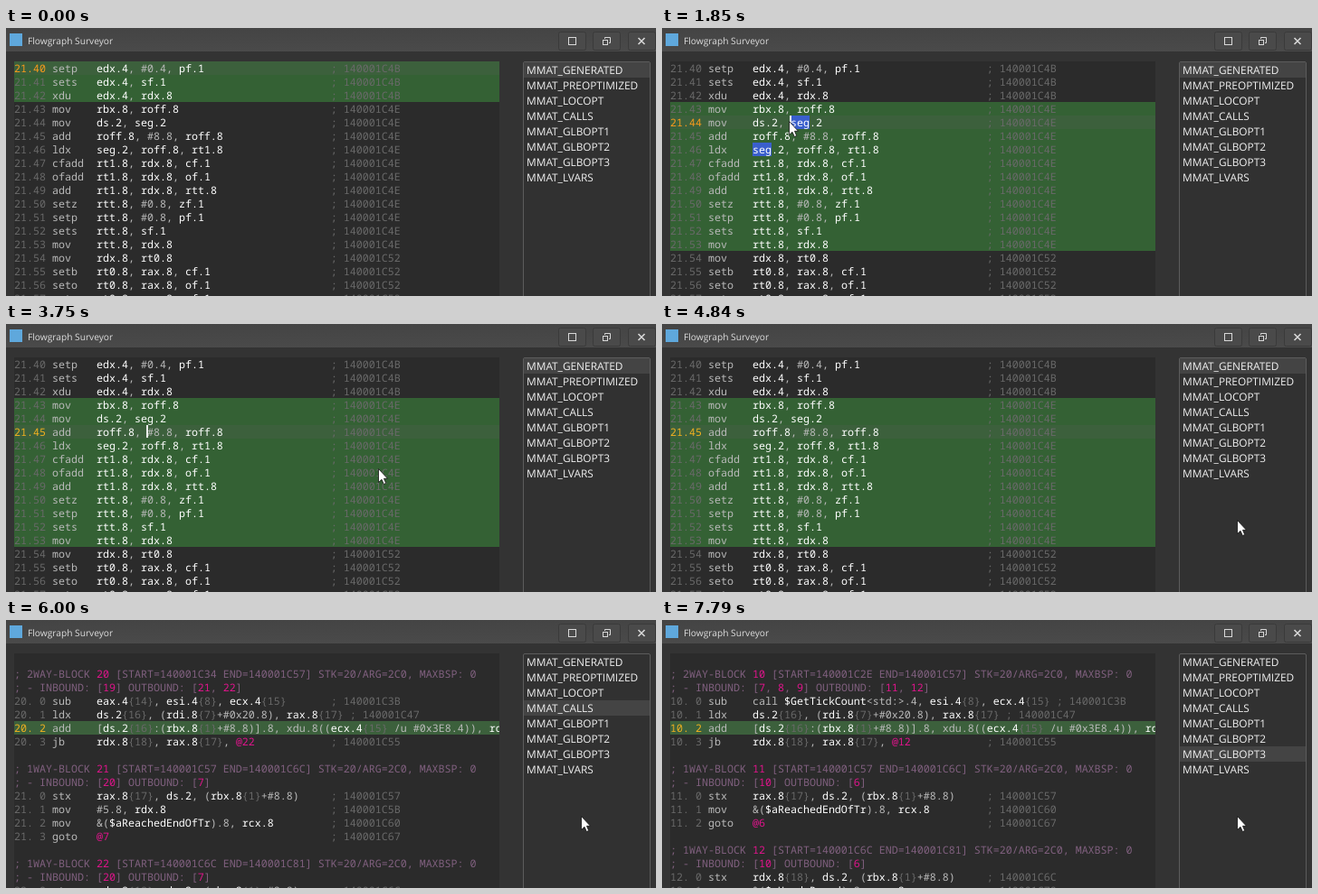
Recreate the animation shown at these times as an HTML page. Size 718x297 px, loop 8000 ms.

```html
<!DOCTYPE html>
<html lang="en">
<head>
<meta charset="utf-8">
<title>Flowgraph Surveyor</title>
<style>
html, body { margin: 0; width: 100%; height: 100%; overflow: hidden; background: #333; }
#stage { position: absolute; left: 0; top: 0; width: 718px; height: 297px; overflow: hidden;
  background: #333; font-family: "Open Sans", "Noto Sans", sans-serif; text-rendering: geometricPrecision; }
#stage div, #stage svg { position: absolute; }
#bar { left: 0; top: 0; width: 718px; height: 26px; background: linear-gradient(#444, #4a4a4a); }
#icon { left: 4px; top: 6px; width: 14px; height: 14px; background: #5fa8dc; }
#title { left: 24px; top: 6px; font-size: 10.2px; line-height: 16px; color: #dcdcdc; white-space: pre; }
#code { left: 9px; top: 37px; width: 536px; height: 260px; overflow: hidden; background: #2b2b2b;
  font: 11.667px/17px "Noto Sans Mono", "DejaVu Sans Mono", monospace; color: #bababa; }
#code .row { left: 0; width: 536px; height: 15px; white-space: pre; }
.num, .dim { color: #696969; }
.reg { color: #fff; }
.pink { color: #e0148c; }
.note { color: #80607f; }
.lilac { color: #b98abb; }
.green { background: #346134; }
.green.here { background: #3c603c; }
#code .mark { height: 15px; width: 21px; background: #3a5fcd; }
#caret { width: 2px; height: 14px; background: #f0f0f0; }
#list { left: 571px; top: 37px; width: 139px; height: 270px; border: 1px solid #5c5c5c; border-radius: 2px;
  background: #313131; }
#list div { left: 0; width: 136px; height: 17px; padding-left: 3px; font-size: 11.85px; line-height: 19px; color: #f0f0f0; }
#list .on { background: #444; }
#over { left: 0; top: 0; }
</style>
</head>
<body>
<div id="stage">
  <div id="bar"></div>
  <div id="icon"></div>
  <div id="title">Flowgraph Surveyor</div>
  <svg id="buttons" width="718" height="30" fill="none" stroke="#d8d8d8">
    <g fill="#4a4a4a" stroke="#3a3a3a">
      <rect x="610.5" y="4.5" width="30" height="20" rx="2"/>
      <rect x="648.5" y="4.5" width="30" height="20" rx="2"/>
      <rect x="687.5" y="4.5" width="30" height="20" rx="2"/>
    </g>
    <rect x="621.5" y="10.5" width="8" height="8"/>
    <path d="M661.5 12V10.5H667.5V16.5H666"/>
    <rect x="659.5" y="13.5" width="5" height="5"/>
    <path d="M698.5 11L705.5 18M705.5 11L698.5 18" stroke-width="1.6"/>
  </svg>
  <div id="code"></div>
  <div id="caret"></div>
  <div id="list"></div>
  <svg id="over" width="718" height="297">
    <circle id="click" r="11.5" fill="#bdb418" fill-opacity=".85"/>
    <path id="arrow" d="M.5 .5V15.5L4 12.3L6.3 17.5L8.7 16.5L6.5 11.3H10.5Z"
      fill="#fff" stroke="#111" stroke-width=".8"/>
  </svg>
</div>
<script>
const LOOP = 8000, ROW = 15, CHAR = 7, LEFT = 9, TOP = 37;
const $ = id => document.getElementById(id);

// Lines are "number mnemonic operands ;address tail"; comments start with ";".
const generated = `21.40 setp edx.4, #0.4, pf.1 ;4B
21.41 sets edx.4, sf.1 ;4B
21.42 xdu edx.4, rdx.8 ;4B
21.43 mov rbx.8, roff.8 ;4E
21.44 mov ds.2, seg.2 ;4E
21.45 add roff.8, #8.8, roff.8 ;4E
21.46 ldx seg.2, roff.8, rt1.8 ;4E
21.47 cfadd rt1.8, rdx.8, cf.1 ;4E
21.48 ofadd rt1.8, rdx.8, of.1 ;4E
21.49 add rt1.8, rdx.8, rtt.8 ;4E
21.50 setz rtt.8, #0.8, zf.1 ;4E
21.51 setp rtt.8, #0.8, pf.1 ;4E
21.52 sets rtt.8, sf.1 ;4E
21.53 mov rtt.8, rdx.8 ;4E
21.54 mov rdx.8, rt0.8 ;52
21.55 setb rt0.8, rax.8, cf.1 ;52
21.56 seto rt0.8, rax.8, of.1 ;52
21.57 setz rt0.8, rax.8, zf.1 ;52`;

const preoptimized = `21. 5 mul xdu.8(ecx.4), xdu.8(eax.4), rt2.8 ;45
21. 6 mov rt2^4.4, edx.4 ;45
21. 7 ldx ds.2, (rdi.8+#0x20.8), rax.8 ;47
21. 8 shr edx.4, #6.1, edx.4 ;4B
21. 9 xdu edx.4, rdx.8 ;4B
21.10 add [ds.2:(rbx.8+#8.8)].8, rdx.8, rdx.8 ;4E
21.11 setb rdx.8, rax.8, cf.1 ;52
21.12 seto rdx.8, rax.8, of.1 ;52
21.13 setz rdx.8, rax.8, zf.1 ;52
21.14 setp rdx.8, rax.8, pf.1 ;52
21.15 sets (rdx.8-rax.8), sf.1 ;52
21.16 jcnd cf.1, $loc_140001C6C ;55

; ????-BLOCK 22 PROP COMB [START=140001C57 END=140001C6C] STK=0/ARG=C0, MAXBSP: 0
22. 0 stx rax.8, ds.2, (rbx.8+#8.8) ;57
22. 1 mov #5.4, edx.4 ;5B
22. 2 xdu edx.4, rdx.8 ;5B
22. 3 mov &($aReachedEndOfTr).8, rcx.8 ;60`;

const block = (way, n, start, end, from, to) =>
  `; ${way}WAY-BLOCK ${n} [START=140001C${start} END=140001C${end}] STK=20/ARG=2C0, MAXBSP: 0
; - INBOUND: [${from}] OUTBOUND: [${to}]`;

const local = `; - INBOUND: [20] OUTBOUND: [22, 23]
21. 0 sub eax.4, esi.4, ecx.4 ;3B
21. 1 mul xdu.8(ecx.4), xdu.8(eax.4), rt2.8 ;45
21. 2 ldx ds.2, (rdi.8+#0x20.8), rax.8 ;47
21. 3 shr rt2^4.4, #6.1, edx.4 ;4B
21. 4 add [ds.2:(rbx.8+#8.8)].8, xdu.8(edx.4), rdx.8 ;4E
21. 5 jb rdx.8, rax.8, @23 ;55

${block(1, 22, "57", "6C", "21", "8")}
22. 0 stx rax.8, ds.2, (rbx.8+#8.8) ;57
22. 1 mov #5.8, rdx.8 ;5B
22. 2 mov &($aReachedEndOfTr).8, rcx.8 ;60
22. 3 goto @8 ;67

${block(1, 23, "6C", "81", "21", "8")}
23. 0 stx rdx.8, ds.2, (rbx.8+#8.8) ;6C`;

const lateBlock = (n, head, from, to, exit) => `
${block(2, n, head, "57", from, to)}
${n}. 0 sub ${n == 10 ? "call $GetTickCount<std:>.4, esi.4{8}" : "eax.4{14}, esi.4{8}"}, ecx.4{15} ;3B
${n}. 1 ldx ds.2{16}, (rdi.8{7}+#0x20.8), rax.8{17} ;47
${n}. 2 add [ds.2{16}:(rbx.8{1}+#8.8)].8, xdu.8((ecx.4{15} /u #0x3E8.4)), rdx.8{18} ;4E
${n}. 3 jb rdx.8{18}, rax.8{17}, @${n + 2} ;55

${block(1, n + 1, "57", "6C", n, exit)}
${n + 1}. 0 stx rax.8{17}, ds.2, (rbx.8{1}+#8.8) ;57`;

const calls = `${lateBlock(20, "34", "19", "21, 22", 7)}
21. 1 mov #5.8, rdx.8 ;5B
21. 2 mov &($aReachedEndOfTr).8, rcx.8 ;60
21. 3 goto @7 ;67

${block(1, 22, "6C", "81", "20", "7")}
22. 0 stx rdx.8{18}, ds.2, (rbx.8{1}+#8.8) ;6C`;

const global = `${lateBlock(10, "2E", "7, 8, 9", "11, 12", 6)}
11. 1 mov &($aReachedEndOfTr).8, rcx.8 ;60
11. 2 goto @6 ;67

${block(1, 12, "6C", "81", "10", "6")}
12. 0 stx rdx.8{18}, ds.2, (rbx.8{1}+#8.8) ;6C
12. 1 mov &($aHandsRound).8, rcx.8 ;70`;

// line: current row, from/to: green rows, col: caret column, marks: [row, column]
const views = [
  { at: 0, text: generated, line: 0, from: 0, to: 2, pick: 0, col: 0, tint: "#f89a1c" },
  { at: 1850, text: generated, line: 4, from: 3, to: 13, pick: 0, col: 19, tint: "#f89a1c", marks: [[4, 19], [6, 13]] },
  { at: 3350, text: generated, line: 5, from: 3, to: 13, pick: 0, col: 21 },
  { at: 5070, text: preoptimized, line: 5, from: 5, to: 5, pick: 1, col: 26 },
  { at: 5300, text: local, line: 5, from: 5, to: 5, pick: 2, col: 26 },
  { at: 6000, text: calls, line: 5, from: 5, to: 5, pick: 3, col: 33 },
  { at: 6470, text: global, line: 5, from: 5, to: 5, pick: 4, col: 33 },
  { at: 7010, text: global, line: 5, from: 5, to: 5, pick: 5, col: 33 },
  { at: 7640, text: global, line: 5, from: 5, to: 5, pick: 6, col: 33 }
];
const caretSpans = [[1850, 2360], [2870, 3800], [4300, 4840], [5380, 5770], [6310, 6780], [7320, 7790]];
const clicks = [[1770, 140, 102], [3270, 156, 119]];

// start, step length, steps, then start, control and end points
const moves = [
  [910, 80, 5, [155, 169], [128, 120], [119, 96]],
  [1370, 80, 4, [123, 97], [130, 98], [140, 103]],
  [2160, 79, 11, [143, 108], [227, 228], [162, 120]],
  [3030, 80, 2, [159, 120], [158, 120], [156, 119]],
  [3430, 80, 9, [168, 121], [420, 150], [635, 217]]
];

function add(parent, tag, cls, text = "") {
  const el = document.createElement(tag);
  el.className = cls;
  el.textContent = text;
  parent.appendChild(el);
  return el;
}

function addNote(row, line) {
  const accent = line.startsWith("; ?") ? "lilac" : "pink";
  const numbers = /(BLOCK \d+|\[[\d, ]+\])/;
  for (const part of line.split(numbers)) {
    if (!numbers.test(part)) { add(row, "span", "note", part); continue; }
    for (const bit of part.split(/(\d+)/)) add(row, "span", /\d/.test(bit) ? accent : "note", bit);
  }
}

function addOperands(row, ops) {
  const tokens = /\{\d+\}|@\d+|#[\w.]+|\$\w+|[a-z]\w*(?:\^\d)?\.\d(?!\()|[^{@#$a-z]+|[a-z]+|./g;
  for (const [tok] of ops.matchAll(tokens)) {
    const cls = tok[0] == "{" ? "dim" : tok[0] == "@" ? "pink"
      : tok[0] == "$" || /^[a-z].*\.\d$/.test(tok) ? "reg" : "";
    add(row, "span", cls, tok);
  }
}

function addLine(row, line, tint) {
  if (!line) return;
  if (line[0] == ";") return addNote(row, line);
  const [, num, name, ops, addr] = line.match(/^(.{5}) (\w+) (.*) ;(\w+)$/);
  const label = add(row, "span", "num", num);
  if (tint) label.style.color = tint;
  add(row, "span", "", " " + name.padEnd(7));
  addOperands(row, ops);
  add(row, "span", "dim", " ".repeat(Math.max(1, 37 - ops.length)) + "; 140001C" + addr);
}

const names = ["GENERATED", "PREOPTIMIZED", "LOCOPT", "CALLS", "GLBOPT1", "GLBOPT2", "GLBOPT3", "LVARS"];
const items = names.map((name, i) => {
  const el = add($("list"), "div", "", "MMAT_" + name);
  el.style.top = i * 17 + "px";
  return el;
});

function showView(v) {
  const code = $("code");
  code.textContent = "";
  const lines = v.text.split("\n");
  const bands = lines.map((_, i) => {
    const cls = i >= v.from && i <= v.to ? "row green" : "row";
    const el = add(code, "div", i == v.line ? cls + " here" : cls);
    el.style.top = i * ROW + "px";
    return el;
  });
  for (const [r, c] of v.marks || []) {
    const el = add(code, "div", "mark");
    el.style.left = c * CHAR + "px";
    el.style.top = r * ROW + "px";
  }
  lines.forEach((line, i) => {
    const row = add(code, "div", "row");
    row.style.top = bands[i].style.top;
    addLine(row, line, i == v.line && (v.tint || "#f0b020"));
  });
  items.forEach((el, i) => el.className = i == v.pick ? "on" : "");
  $("caret").style.left = LEFT + v.col * CHAR - 1 + "px";
  $("caret").style.top = TOP + v.line * ROW + "px";
}

function pointer(t) {
  const move = moves.findLast(m => t >= m[0]);
  if (!move) return null;
  const [start, step, count, a, b, c] = move;
  const k = Math.min(Math.floor((t - start) / step), count - 1) / (count - 1);
  const s = k * k * (3 - 2 * k);
  return a.map((p, i) => Math.round((1 - s) ** 2 * p + 2 * s * (1 - s) * b[i] + s * s * c[i]));
}

const show = (el, on) => el.style.visibility = on ? "visible" : "hidden";
let current = null;

function draw() {
  const t = performance.now() % LOOP;
  const view = views.findLast(v => t >= v.at);
  if (view != current) showView(current = view);
  show($("caret"), caretSpans.some(([a, b]) => t >= a && t < b));

  const pos = pointer(t);
  show($("arrow"), pos);
  if (pos) $("arrow").setAttribute("transform", `translate(${pos})`);

  const click = clicks.find(([at]) => t >= at && t < at + 80);
  show($("click"), click);
  if (click) $("click").setAttribute("transform", `translate(${click[1]},${click[2]})`);
  requestAnimationFrame(draw);
}
draw();
</script>
</body>
</html>
```
